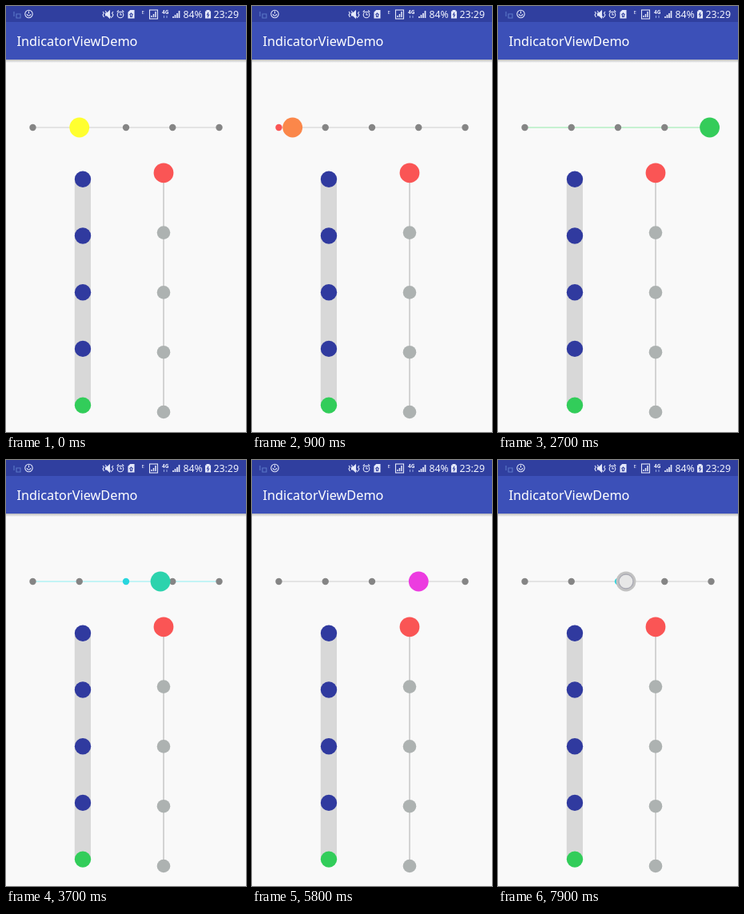
Write an HTML page that moves like this. It is 300 px wide and 533 px high and loops after 8 s.

```html
<!DOCTYPE html>
<html lang="en">
<head>
<meta charset="utf-8">
<title>Indicator views</title>
<style>
html, body { margin: 0; width: 100%; height: 100%; overflow: hidden; background: #f9f9f9; }
svg { display: block; width: 300px; height: 533px; font-family: "Noto Sans", "Open Sans", sans-serif; }
</style>
</head>
<body>
<svg id="stage" viewBox="0 0 300 533">
  <defs>
    <linearGradient id="shade" x2="0" y2="1">
      <stop stop-color="#000" stop-opacity=".25"/>
      <stop offset="1" stop-color="#000" stop-opacity="0"/>
    </linearGradient>
  </defs>
  <rect width="300" height="533" fill="#f9f9f9"/>
  <rect y="20" width="300" height="47" fill="#3c50b8"/>
  <rect width="300" height="20" fill="#303f9f"/>
  <rect y="67" width="300" height="4" fill="url(#shade)"/>
  <text x="13.5" y="50" font-size="16.3" fill="#fff">IndicatorViewDemo</text>

  <g fill="none" stroke="#e4e8fa" stroke-width="1.1">
    <path d="M10 7v6M13 10h5v5h-5z" stroke="#5b78c8"/>
    <circle cx="28.5" cy="10" r="4.7"/>
    <path d="M26.3 10a2.2 2.2 0 1 0 4.4 0M28.5 6.5v3"/>
    <path d="M121 7l1.5 2-1.5 2 1.5 3M134 7l-1.5 2 1.5 2-1.5 3M124 6l8 9"/>
    <path d="M124.5 9h2l3-3v9l-3-3h-2z" fill="#e4e8fa"/>
    <circle cx="143" cy="11" r="3.8"/>
    <path d="M143 8.5V11h2M138.7 7.5l2.2-2M147.3 7.5l-2.2-2"/>
    <path d="M153 15V8l2.5-2.5h4.5V15z" fill="#e4e8fa"/>
    <path d="M154.5 11l2-2 2 2M155.5 11v2.500h2V11" stroke="#303f9f"/>
    <rect x="179.500" y="5" width="10" height="11"/>
    <path d="M182 14v-2M184.500 14v-4M187 14V7" stroke-width="1.5"/>
    <path d="M197.500 12v3M201 12v3" stroke="#93a5df"/>
    <path d="M209 15v-2M211.500 15v-4M214 15V9M216.500 15V6" stroke-width="1.7"/>
    <path d="M249.500 7h1.5V5.500h3V7h1.500v8h-6z" fill="#e4e8fa"/>
    <path d="M253 8l-1.500 3h2l-1.500 3" stroke="#303f9f"/>
  </g>
  <g fill="#f2f4ff" font-size="12.3">
    <text x="169.500" y="10" font-size="6">E</text>
    <text x="195" y="10" font-size="6.500" font-weight="bold">4G</text>
    <text x="221.500" y="15">84%</text>
    <text x="259.500" y="15">23:29</text>
  </g>

  <rect x="85.800" y="217" width="20.200" height="283" fill="#d8d8d8"/>
  <path d="M197 209V508" stroke="#cdcdcd" stroke-width="1.7"/>
  <g id="columns"></g>

  <path d="M33.500 152H266.500" stroke="#dedede" stroke-width="1.4"/>
  <path id="tint" stroke-width="1.8"/>
  <g id="row"></g>
  <circle id="thumb" cy="152" r="12.4"/>
  <circle id="touch" r="9" fill="#fff" fill-opacity=".6" stroke-width="1.300"/>
</svg>
<script>
const $ = id => document.getElementById(id);
const set = (el, attrs) => { for (const k in attrs) el.setAttribute(k, attrs[k]); return el; };
const dot = (parent, cx, cy, r, fill) => parent.appendChild(
  set(document.createElementNS("http://www.w3.org/2000/svg", "circle"), { cx, cy, r, fill }));
const mix = (a, b, p) => a + (b - a) * p;
const rgb = c => `rgb(${c.map(Math.round)})`;
const mixColor = (a, b, p) => rgb(a.map((v, i) => mix(v, b[i], p)));

const LOOP = 8000, DURATION = 1200, FIRST = 140, PERIOD = 1430;
const GREY = "#858585";
const colors = [[250, 85, 85], [255, 255, 48], [40, 214, 222], [236, 60, 224], [50, 205, 90]];
const stops = [1, 0, 4, 2, 3, 2];
const dotX = i => 33.5 + i * 58.25;

for (let i = 0; i < 5; i++) {
  dot($("columns"), 96, 216.8 + i * 70.7, 10.2, i < 4 ? "#303a9f" : "#32cd5a");
  dot($("columns"), 197, 208.8 + i * 74.8, i ? 8.3 : 12.4, i ? "#adb2b1" : rgb(colors[0]));
}
const row = colors.map((c, i) => dot($("row"), dotX(i), 152, 4.2, GREY));

function draw(t) {
  const step = Math.max(0, Math.min(4, Math.floor((t - FIRST) / PERIOD)));
  const start = FIRST + step * PERIOD;
  const u = Math.max(0, Math.min(1, (t - start) / DURATION));
  const p = (1 - Math.cos(Math.PI * u)) / 2;
  const from = stops[step], to = stops[step + 1];
  const moving = u > 0 && u < 1;

  // The last gesture drags the thumb away from the middle stop.
  const dragging = t >= 7500;
  const drag = dragging ? Math.min(1, (t - 7500) / 400) : 0;
  const x = mix(dotX(from), dotX(to), p) + drag * 10;

  row.forEach((el, i) => set(el, { fill: i === to && t > start ? rgb(colors[i]) : GREY }));
  set($("tint"), {
    d: `M${to === 3 ? dotX(1) : dotX(0)} 152H${dotX(4)}`,
    stroke: mixColor(colors[to], [255, 255, 255], 0.72),
    visibility: moving && to !== 0 ? "visible" : "hidden"
  });
  set($("thumb"), { cx: x, fill: dragging ? "#c2c2c2" : mixColor(colors[from], colors[to], p) });

  const tapping = t > start - 60 && t < start + 180;
  set($("touch"), {
    cx: dragging ? x : dotX(to) + 0.5,
    cy: dragging ? mix(145, 152, drag) : 149,
    visibility: dragging || tapping ? "visible" : "hidden",
    stroke: dragging ? "#aaaab4" : "#cdc6e8"
  });
}

function frame() {
  draw(performance.now() % LOOP);
  requestAnimationFrame(frame);
}
frame();
</script>
</body>
</html>
```
